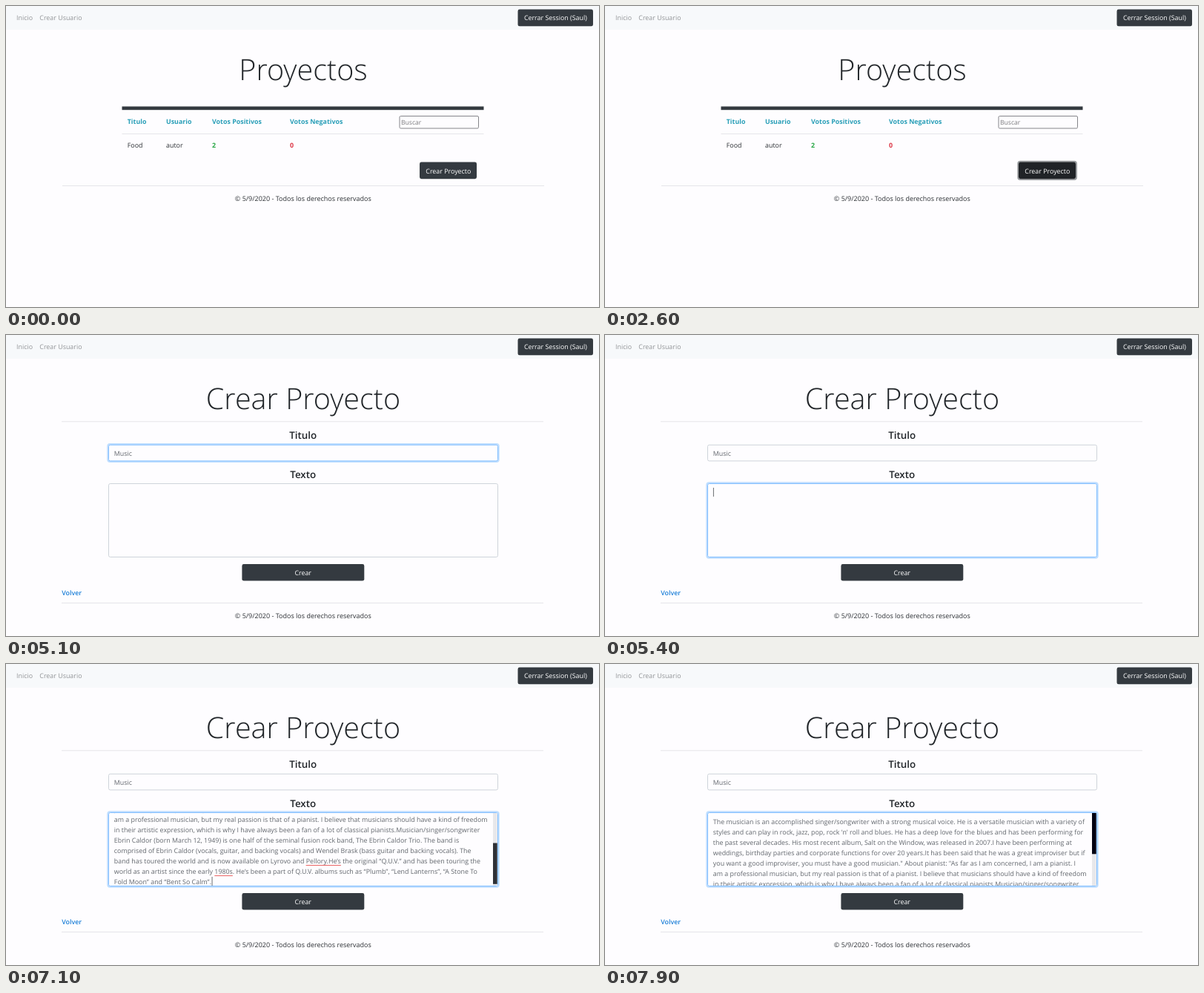
An HTML page that plays this animation: 800x406 px, repeating every 8 s.

```html
<!DOCTYPE html>
<html lang="es">
<head>
<meta charset="utf-8">
<title>Proyectos</title>
<style>
  html, body { margin: 0; width: 100%; height: 100%; overflow: hidden; background: #fefdff; }
  svg { display: block; width: 800px; height: 406px; }
  text { font: 400 8.9px "Open Sans", "Noto Sans", sans-serif; fill: #2b2f33; text-rendering: geometricPrecision; white-space: pre; }
  .foot { font-size: 9px; text-anchor: middle; }
  .title { font-size: 39.5px; font-weight: 300; fill: #212529; text-anchor: middle; }
  .label { font-size: 13.4px; font-weight: 600; fill: #212529; text-anchor: middle; }
  .nav { fill: #929497; }
  .head { font-weight: 700; fill: #2a9fb8; }
  .up { font-weight: 700; fill: #28a745; }
  .down { font-weight: 700; fill: #dc3545; }
  .hint { font-size: 8.6px; fill: #7b7b7e; }
  .link { font-weight: 600; fill: #1f80d8; }
  .light { fill: #fff; text-anchor: middle; }
  .typed { fill: #62676d; }
  .dark { fill: #343a40; }
  .rule { stroke: #e5e5e9; }
  .field { fill: #fefdff; stroke: #ced4da; }
  .glow { fill: none; stroke: #bfdeff; stroke-width: 2; }
  .caret { stroke: #44484c; stroke-width: .8; }
  .typo { stroke: #e8504f; stroke-width: .9; }
</style>
</head>
<body>
<svg viewBox="0 0 800 406">
  <defs><clipPath id="inside"><rect x="139" y="201" width="518" height="98"/></clipPath></defs>
  <rect width="800" height="406" fill="#fefdff"/>
  <rect width="800" height="32" fill="#f7f9fb"/>
  <text class="nav" x="14" y="19.4">Inicio</text>
  <text class="nav" x="45.3" y="19.4">Crear Usuario</text>
  <rect class="dark" x="690.5" y="4.5" width="101.5" height="22.8" rx="2.4"/>
  <text class="light" x="741.4" y="19.4">Cerrar Session (Saul)</text>

  <g id="listPage">
    <text class="title" x="401" y="100">Proyectos</text>
    <rect class="dark" x="156.5" y="135.5" width="488" height="4.7"/>
    <text class="head" x="163.7" y="158.6">Titulo</text>
    <text class="head" x="216" y="158.6">Usuario</text>
    <text class="head" x="278" y="158.6">Votos Positivos</text>
    <text class="head" x="383" y="158.6">Votos Negativos</text>
    <rect x="531" y="148.5" width="106.5" height="16.5" rx="1.5" fill="#fefdff" stroke="#85858a"/>
    <text class="hint" x="533" y="160">Buscar</text>
    <path class="rule" d="M156.5 172.5h488"/>
    <text x="163.7" y="191">Food</text>
    <text x="216" y="191">autor</text>
    <text class="up" x="278" y="191">2</text>
    <text class="down" x="383" y="191">0</text>
    <rect id="ring" x="557.2" y="209.7" width="78.8" height="24.4" rx="3" fill="none" stroke="#999c9f" stroke-width="1.9"/>
    <rect id="create" x="558" y="210.5" width="77" height="22.7" rx="2.4"/>
    <text class="light" x="596.8" y="225.5">Crear Proyecto</text>
    <path class="rule" d="M76 242.5h650"/>
    <text class="foot" x="400.8" y="263">© 5/9/2020 - Todos los derechos reservados</text>
  </g>

  <g id="formPage">
    <text class="title" x="401" y="100">Crear Proyecto</text>
    <path class="rule" d="M75 116.8h650"/>
    <text class="label" x="400.7" y="140">Titulo</text>
    <rect class="glow" id="glow1" x="137.3" y="147.1" width="527.4" height="24" rx="3"/>
    <rect class="field" id="field1" x="138.5" y="148.3" width="525" height="21.6" rx="2.2"/>
    <text class="typed" id="name" x="145.8" y="162.6"></text>
    <path class="caret" id="caret1" d="M0 153v12.4"/>
    <text class="label" x="400.7" y="193">Texto</text>
    <rect class="glow" id="glow2" x="137.3" y="199.3" width="527.4" height="101.4" rx="3"/>
    <rect class="field" id="field2" x="138.5" y="200.5" width="525" height="99" rx="2.2"/>
    <g id="body">
      <g clip-path="url(#inside)"><g id="lines"></g></g>
      <rect x="657" y="201" width="5.7" height="98" fill="#e8e8eb"/>
      <rect id="thumb" x="657" width="5.7" height="55.3"/>
    </g>
    <path class="caret" id="caret2" d="M0 0v12"/>
    <rect class="dark" x="318.4" y="309" width="164.9" height="22.6" rx="2.4"/>
    <text class="light" x="400.7" y="324">Crear</text>
    <text class="link" x="75.2" y="350.5">Volver</text>
    <path class="rule" d="M75 361.5h650"/>
    <text class="foot" x="400.8" y="382">© 5/9/2020 - Todos los derechos reservados</text>
  </g>
</svg>
<script>
const DURATION = 8000, STEP = 100, PITCH = 14.05, MAX_SCROLL = 72.7;
const LINES = [
  'The musician is an accomplished singer/songwriter with a strong musical voice. He is a versatile musician with a variety of',
  "styles and can play in rock, jazz, pop, rock 'n' roll and blues. He has a deep love for the blues and has been performing for",
  'the past several decades. His most recent album, Salt on the Window, was released in 2007.I have been performing at',
  'weddings, birthday parties and corporate functions for over 20 years.It has been said that he was a great improviser but if',
  'you want a good improviser, you must have a good musician." About pianist: "As far as I am concerned, I am a pianist. I',
  'am a professional musician, but my real passion is that of a pianist. I believe that musicians should have a kind of freedom',
  'in their artistic expression, which is why I have always been a fan of a lot of classical pianists.Musician/singer/songwriter',
  'Ebrin Caldor (born March 12, 1949) is one half of the seminal fusion rock band, The Ebrin Caldor Trio. The band is',
  'comprised of Ebrin Caldor (vocals, guitar, and backing vocals) and Wendel Brask (bass guitar and backing vocals). The',
  'band has toured the world and is now available on Lyrovo and Pellory.He’s the original “Q.U.V.” and has been touring the',
  'world as an artist since the early 1980s. He’s been a part of Q.U.V. albums such as “Plumb”, “Lend Lanterns”, “A Stone To',
  'Fold Moon” and “Bent So Calm”.'
];
const TYPOS = [[9, 'Pellory.He’s'], [10, '1980s']];
const TYPING = [[4000, 'M'], [4300, 'Mu'], [4400, 'Mus'], [4500, 'Musi'], [4600, 'Music']];
const SCROLL = [[0, MAX_SCROLL], [7600, 58], [7700, 36], [7800, 12], [7900, 0]];

const $ = id => document.getElementById(id);
const svgNode = (tag, attrs, parent) => {
  const node = document.createElementNS('http://www.w3.org/2000/svg', tag);
  for (const key in attrs) node.setAttribute(key, attrs[key]);
  return parent.appendChild(node);
};
const show = (id, on) => { $(id).style.display = on ? '' : 'none'; };
const ramp = (t, from, to) => Math.min(1, Math.max(0, (t - from) / (to - from)));
const within = (t, from, to) => t >= from && t < to;
const mix = (a, b, k) => `rgb(${a.map((v, i) => Math.round(v + (b[i] - v) * k))})`;
const latest = (table, t, initial) => table.reduce((value, [at, next]) => t >= at ? next : value, initial);

const baseline = row => 215.6 + row * PITCH;
const rows = LINES.map((line, i) => {
  const node = svgNode('text', { class: 'typed', x: 145.8, y: baseline(i) }, $('lines'));
  node.textContent = line;
  return node;
});
for (const [row, word] of TYPOS) {
  const start = LINES[row].indexOf(word);
  const x1 = rows[row].getStartPositionOfChar(start).x;
  const x2 = rows[row].getEndPositionOfChar(start + word.length - 1).x;
  svgNode('path', { class: 'typo', d: `M${x1} ${baseline(row) + 2.2}H${x2}` }, $('lines'));
}
const textEnd = 146.8 + rows[rows.length - 1].getComputedTextLength();

function setFocus(n, k) {
  $('glow' + n).style.opacity = k;
  $('field' + n).style.stroke = mix([206, 212, 218], [128, 189, 255], k);
}

function placeCaret(n, on, x, y) {
  show('caret' + n, on);
  $('caret' + n).setAttribute('transform', `translate(${x} ${y})`);
}

function drawList(t) {
  const hover = ramp(t, 0, 400) - ramp(t, 500, 900) + ramp(t, 1600, 1900);
  $('create').style.fill = mix([52, 58, 64], [32, 35, 39], hover);
  $('ring').style.opacity = ramp(t, 2200, 2600);
}

function drawForm(t) {
  const moved = ramp(t, 5200, 5400);
  setFocus(1, ramp(t, 3600, 4000) * (1 - moved));
  setFocus(2, moved);

  $('name').textContent = latest(TYPING, t, '');
  placeCaret(1, within(t, 3700, 5100), 146.4 + $('name').getComputedTextLength(), 0);

  const pasted = t >= 5800;
  const scroll = latest(SCROLL, t, MAX_SCROLL);
  show('body', pasted);
  $('lines').setAttribute('transform', `translate(0 ${-scroll})`);
  $('thumb').setAttribute('y', 201 + 40.5 * scroll / MAX_SCROLL);
  $('thumb').style.fill = t >= 7300 ? '#020212' : '#2f3136';

  const blinkOn = within(t, 5300, 6300) || within(t, 6800, 7300);
  if (pasted) placeCaret(2, blinkOn, textEnd, 287);
  else placeCaret(2, blinkOn, 146.4, 206);
}

function frame() {
  const t = Math.floor(performance.now() % DURATION / STEP) * STEP;
  const onList = t < 2700;
  show('listPage', onList);
  show('formPage', !onList);
  (onList ? drawList : drawForm)(t);
  requestAnimationFrame(frame);
}
frame();
</script>
</body>
</html>
```
